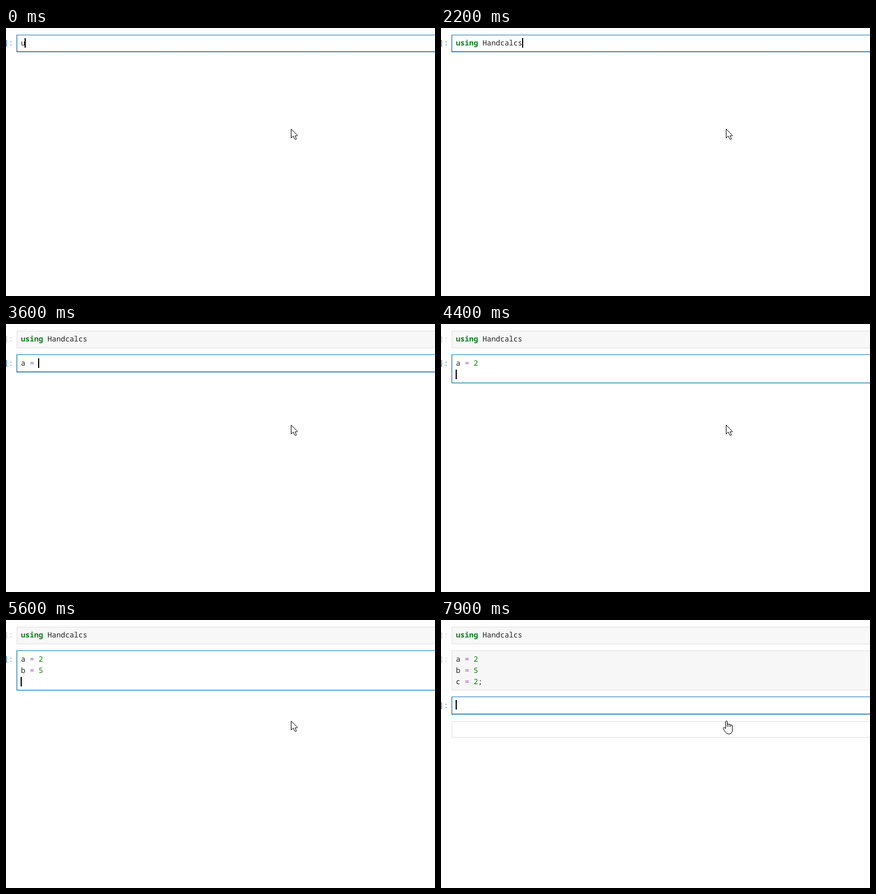
An HTML page with a canvas for the animation above (8 s loop, 762x476 px).

```html
<!DOCTYPE html>
<html lang="en">
<head>
<meta charset="utf-8">
<title>Notebook typing</title>
<style>
  html, body { margin: 0; width: 100%; height: 100%; overflow: hidden; background: #fff; }
  canvas { display: block; }
</style>
</head>
<body>
<canvas id="stage" width="762" height="476"></canvas>
<script>
const W = 762, H = 476, LOOP = 8000, TICK = 100;
const ctx = document.getElementById('stage').getContext('2d');

const LEFT = 19, CARET_X = 26, TEXT_X = 26.5, ADVANCE = 7.87, LINE = 20;
const FONT = '13.1px "Noto Sans Mono", monospace';
const BLUE = '#2479b2', SOFT_BLUE = 'rgba(36,121,178,0.3)', DOT_BLUE = '#173f78';
const PROMPT = '#307fc1', PROMPT_IDLE = '#bdbdbd';
const EDGE = '#e0e0e0', IDLE_FILL = '#f7f7f7';
const INK = '#212121', KEYWORD = '#147a1c', NUMBER = '#088008', OPERATOR = '#9a4cba';

// One keystroke per tick; "_" is a tick without typing.
const FIRST = 'u_sing _H_an_dc__a_l_cs';
const SECOND = '_____a_ = ___2___\n_b_ = ___5_\n__c _= _2__;';
const RUN_1 = 2700, RUN_2 = 7100;

const cells = [
  { top: 12, bottom: 42, caret: 18, start: 0, end: RUN_1, script: FIRST },
  { top: 54, bottom: 85, caret: 61, start: RUN_1, end: RUN_2, script: SECOND },
  { top: 136, bottom: 167, caret: 142, start: RUN_2, end: Infinity, script: '' }
];

function rect(color, x, y, w, h) {
  ctx.fillStyle = color;
  ctx.fillRect(x, y, w, h);
}

function write(text, x, y, color, bold) {
  ctx.font = (bold ? 'bold ' : '') + FONT;
  ctx.fillStyle = color;
  ctx.fillText(text, x, y);
}

function tokenStyle(token) {
  if (token === 'using') return [KEYWORD, true];
  if (token === '=') return [OPERATOR, false];
  if (/^\d/.test(token)) return [NUMBER, false];
  return [INK, false];
}

function drawCode(line, y) {
  for (const m of line.matchAll(/\w+|[=;]/g))
    write(m[0], TEXT_X + m.index * ADVANCE, y, ...tokenStyle(m[0]));
}

function idleBox(top, bottom, fill) {
  rect(EDGE, LEFT, top, W, bottom - top + 1);
  rect(fill, LEFT + 1, top + 1, W, bottom - top - 1);
}

function activeBox(top, bottom, single) {
  rect(SOFT_BLUE, LEFT - 1, top, 1, bottom - top + 1);
  rect(BLUE, LEFT, top, W, bottom - top + 1);
  rect('#fff', LEFT + 1, top + 1, W, bottom - top - 1);
  if (single) {
    for (let x = LEFT + 1; x < W; x += 2) rect(DOT_BLUE, x, bottom - 1, 1, 1);
  } else {
    rect(SOFT_BLUE, LEFT, bottom + 1, W, 1);
  }
}

// The caret blinks off for 300 ms near the start of a cell.
function caretVisible(t, cell) {
  const age = t - cell.start;
  return cell.start === 0 || age < 400 || age >= 800 ||
    (cell.script === '' && age < 500);
}

function drawCell(cell, t) {
  if (t < cell.start) return;
  const ticks = Math.floor((t - cell.start) / TICK) + 1;
  const lines = cell.script.slice(0, ticks).replaceAll('_', '').split('\n');
  const last = lines.length - 1;
  const bottom = last ? cell.top + 30 + LINE * last : cell.bottom;
  const active = t < cell.end;

  if (active) activeBox(cell.top, bottom, !last);
  else idleBox(cell.top, bottom, IDLE_FILL);

  write(']:', -2.9, cell.bottom - 11, active ? PROMPT : PROMPT_IDLE);
  lines.forEach((line, i) => drawCode(line, cell.caret + 13 + LINE * i));

  if (active && caretVisible(t, cell)) {
    const x = Math.floor(CARET_X + lines[last].length * ADVANCE);
    rect('#000', x, cell.caret + LINE * last, 2, 17);
  }
}

function drawShape(path) {
  const shape = new Path2D(path);
  ctx.fillStyle = '#fff';
  ctx.strokeStyle = '#000';
  ctx.lineWidth = 1;
  ctx.lineJoin = 'round';
  ctx.fill(shape);
  ctx.stroke(shape);
}

const ARROW = 'M506.5 179.5V195.5L510.2 192L513 197.5H515.5V196L513.3 191.5H517.5V190.5Z';
const HAND = 'M505.5 193V181Q505.5 179.5 507 179.5T508.5 181V186Q508.5 184.7 510 184.8' +
  'T511.5 186.2Q511.6 185 513 185.2T514.5 187Q514.7 186 516 186.3T517.5 188V195' +
  'Q517.5 202.5 511 202.5Q507 202.5 505 199L501.6 193.2Q500.8 191.3 502.2 190.7' +
  'Q503.6 190.3 505.5 193Z';
const KNUCKLES = 'M508.5 186V190M511.5 186.5V190M514.5 187V190';

function drawPointer(t) {
  if (t < RUN_2) return drawShape(ARROW);
  drawShape(HAND);
  ctx.stroke(new Path2D(KNUCKLES));
}

function draw(t) {
  rect('#fff', 0, 0, W, H);
  ctx.textRendering = 'geometricPrecision';
  cells.forEach(cell => drawCell(cell, t));
  if (t >= RUN_2) idleBox(180, 208, '#fff');
  drawPointer(t);
}

const began = performance.now();
function tick() {
  draw((performance.now() - began) % LOOP);
  requestAnimationFrame(tick);
}
tick();
</script>
</body>
</html>
```
